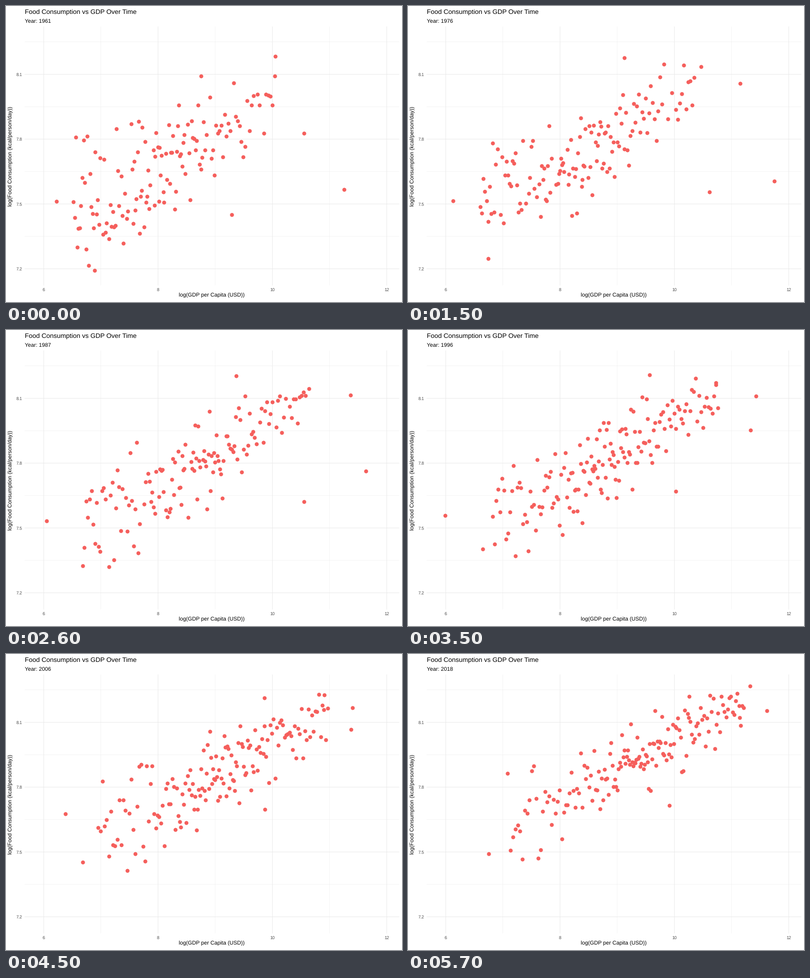
Recreate the animation shown at these times as a matplotlib script. Size 800 by 600 pixels, loop 5.8 s.

```python
import numpy as np
import matplotlib.pyplot as plt
from matplotlib.animation import FuncAnimation

W, H, PT = 800, 600, 0.72          # stage in pixels, points per pixel at 100 dpi
START, YEARS = 1961, 58
N_OLD, N_ALL, SPLIT = 136, 156, 30  # new countries join in 1991
T = np.arange(YEARS)
plt.rcParams.update({"font.family": "Liberation Sans", "text.hinting": "none"})

# Dots that stand apart: x + y*j at four evenly spaced years
LONERS = [
    (683+372j, 755+350j, 680+175j, 725+115j),
    (602+258j, 690+130j, 705+135j, 691+65j),
    (456+423j, 650+365j, 520+320j, 528+307j),
    (102+396j, 88+395j, 72+372j, 201+242j),
    (179+536j, 158+505j, 150+432j, 163+405j),
    (394+142j, 448+95j, 495+90j, 568+86j),
    (544+102j, 605+128j, 625+103j, 670+129j),
]

rng = np.random.default_rng(7)


def mix(a, b, s):
    return a + (b - a) * s


def wander(keep, slow, jitter):
    """Lasting level, slow swing and yearly noise for each dot."""
    t = T[:, None]
    base, a, b = rng.normal(size=(3, N_ALL))
    w = rng.uniform(0.06, 0.22, N_ALL)
    swing = a * np.cos(w * t) + b * np.sin(w * t)
    noise = rng.normal(size=(YEARS, N_ALL))
    return keep * base + slow * swing + jitter * noise


WEALTH = wander(0.96, 0.26, 0.01)
TASTE = np.clip(wander(0.72, 0.68, 0.1), -2.2, 2.2)


def cloud(i):
    """Incomes spread over a growing range; food rises along a power curve."""
    s = i / (YEARS - 1)
    rank = (WEALTH[i].argsort().argsort() + 0.5) / N_ALL
    v = rank + 0.05 * np.sin(2 * np.pi * rank)
    v -= mix(0.28, -0.2, s) * v * (1 - v)
    x = mix(mix(135, 205, s ** 1.5), mix(545, 680, s), v)
    mean = mix(398, 360, s) - mix(235, 250, s) * v ** mix(1.6, 0.85, s)
    y = mean + mix(60, 44, s) * (1 - 0.5 * v ** 2) * TASTE[i]
    y = 80 + abs(y - 80)
    return (x + 1j * y)[:N_OLD if i < SPLIT else N_ALL]


def loners(i):
    keys = np.linspace(0, YEARS - 1, 4)
    return [np.interp(i, keys, path) for path in LONERS]


fig = plt.figure(figsize=(W / 100, H / 100), dpi=100, facecolor="white")
ax = fig.add_axes([0, 0, 1, 1])
ax.set(xlim=(0, W), ylim=(H, 0))
ax.axis("off")


def label(x, y, s, size, color="black", **kw):
    return ax.text(x, y, s, size=size * PT, color=color, **kw)


def px(v):
    return 76.2 + (v - 6) * 115.5


def py(v):
    return 138.5 + (8.1 - v) * 438


def grid(xs, ys, width):
    style = dict(color="#EBEBEB", lw=width * PT, snap=False, zorder=1)
    for v in xs:
        ax.plot([px(v)] * 2, [42, 566], **style)
    for v in ys:
        ax.plot([38, 794], [py(v)] * 2, **style)


X_TICKS, Y_TICKS = (6, 8, 10, 12), (7.2, 7.5, 7.8, 8.1)
grid((7, 9, 11), (7.35, 7.65, 7.95, 8.25), 0.53)
grid(X_TICKS, Y_TICKS, 1.07)
for v in X_TICKS:
    label(px(v), 578, v, 8.8, "#4D4D4D", ha="center")
for v in Y_TICKS:
    label(33, py(v) + 3.4, v, 8.8, "#4D4D4D", ha="right")

label(38, 16, "Food Consumption vs GDP Over Time", 13.2)
subtitle = label(38, 34, "", 11)
label(416, 590, "log(GDP per Capita (USD))", 11, ha="center")
label(13, 304.5, "log(Food Consumption (kcal/person/day))", 11,
      rotation=90, rotation_mode="anchor", ha="center")
dots, = ax.plot([], [], "o", ms=8 * PT, mew=0, color="#F55F5C", zorder=3)


def draw(i):
    p = np.concatenate([cloud(i), loners(i)])
    dots.set_data(p.real, p.imag)
    subtitle.set_text(f"Year: {START + i}")
    return dots, subtitle


anim = FuncAnimation(fig, draw, frames=YEARS, interval=100,
                     repeat=True, repeat_delay=0)
plt.show()
```
